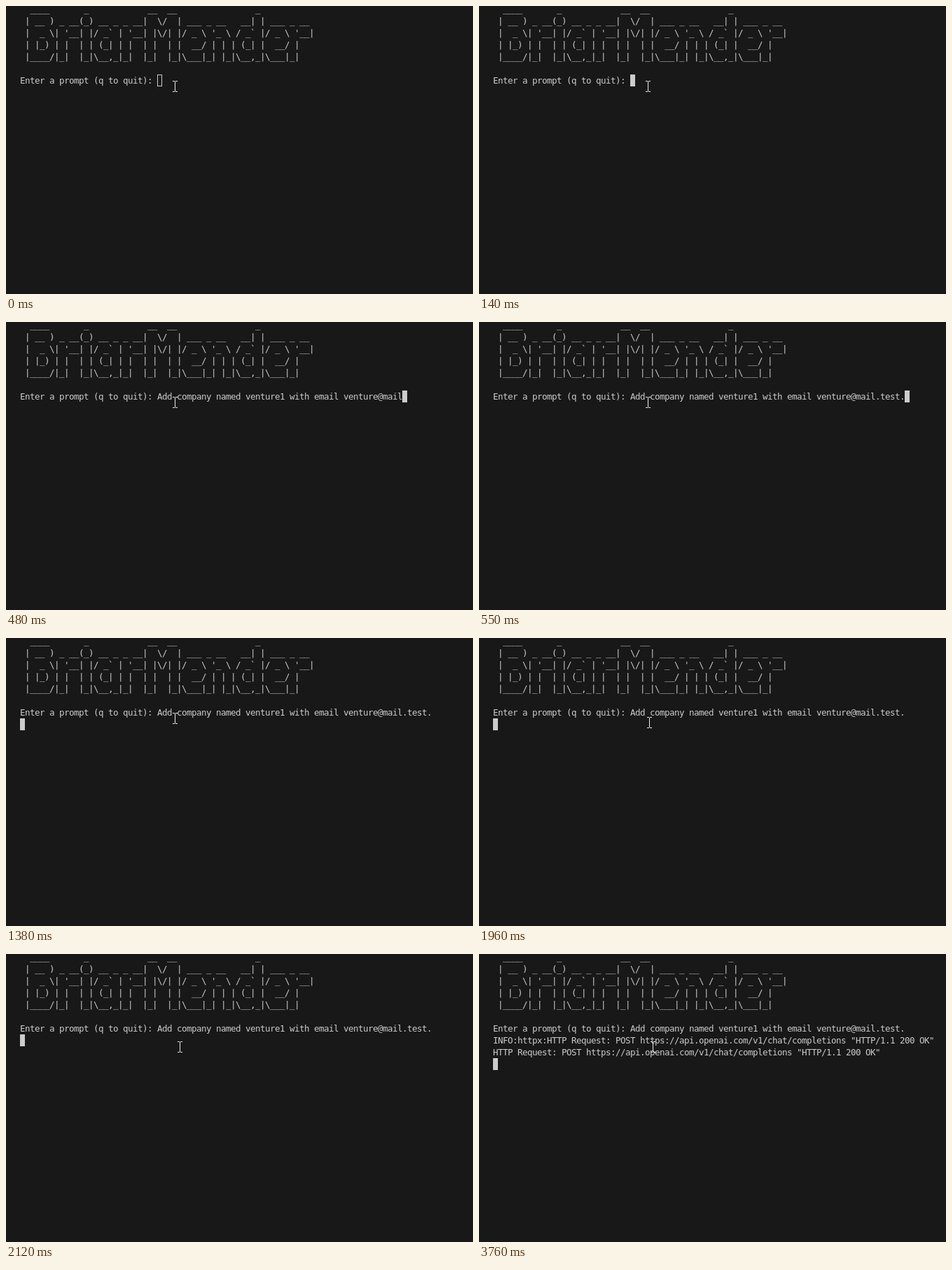
Animation of 667 by 412 pixels, one loop 8000 ms. Source, as an HTML page:

```html
<!DOCTYPE html>
<html lang="en">
<head>
<meta charset="utf-8">
<title>Terminal</title>
<style>
html, body { margin: 0; width: 100%; height: 100%; overflow: hidden; background: #181818; }
pre {
  position: absolute; left: 20px; top: -4px; margin: 0;
  font: 12.5px/17px "DejaVu Sans Mono", "Noto Sans Mono", monospace;
  letter-spacing: calc(7px - 1ch); /* terminal cells are 7px wide */
  font-variant-ligatures: none; color: #ccc;
}
#caret {
  position: absolute; left: 0; top: 0; width: 7px; height: 17px;
  box-sizing: border-box; border: 1px solid #ccc;
}
#mouse { position: absolute; left: 0; top: 0; }
</style>
</head>
<body>
<pre>
  ____       _            __  __                _
 | __ ) _ __(_) __ _ _ __|  \/  | ___ _ __   __| | ___ _ __
 |  _ \| '__| |/ _` | '__| |\/| |/ _ \ '_ \ / _` |/ _ \ '__|
 | |_) | |  | | (_| | |  | |  | |  __/ | | | (_| |  __/ |
 |____/|_|  |_|\__,_|_|  |_|  |_|\___|_| |_|\__,_|\___|_|

<span id="out"></span></pre>
<div id="caret"></div>
<svg id="mouse" width="7" height="16" fill="none" stroke="#eee">
  <path d="M0 .5h3m1 0h3M3.5 1v14M0 15.5h3m1 0h3"/>
</svg>
<script>
const LOOP = 8000, CELL = 7, LINE = 17, LEFT = 20, TOP = -4;
const $ = id => document.getElementById(id);
const out = $('out'), caret = $('caret'), mouse = $('mouse');

const prompt = 'Enter a prompt (q to quit): ';
const input = 'Add company named venture1 with email venture@mail.test.';
const request = 'HTTP Request: POST https://api.openai.com/v1/chat/completions "HTTP/1.1 200 OK"';

const place = (el, x, y) => { el.style.transform = `translate(${x}px, ${y}px)`; };

function draw(t) {
  const typed = t < 480 ? 0 : t < 550 ? 50 : input.length;
  const lines = [prompt + input.slice(0, typed)];
  if (t >= 3760) lines.push('INFO:httpx:' + request, request);
  if (t >= 1380) lines.push('');

  const text = lines.join('\n');
  if (out.textContent !== text) out.textContent = text;

  const row = 5 + lines.length, col = lines.at(-1).length;
  place(caret, LEFT + col * CELL, TOP + row * LINE);
  caret.style.background = t < 140 ? 'none' : '#ccc';

  // The pointer slides down in three steps, 80 ms apart.
  const step = Math.max(0, Math.min(3, Math.floor((t - 1960) / 80) + 1));
  place(mouse, 238 + Math.round(step * 7 / 3), 107 + step * 6);
}

function tick() {
  draw(performance.now() % LOOP);
  requestAnimationFrame(tick);
}
tick();
</script>
</body>
</html>
```
